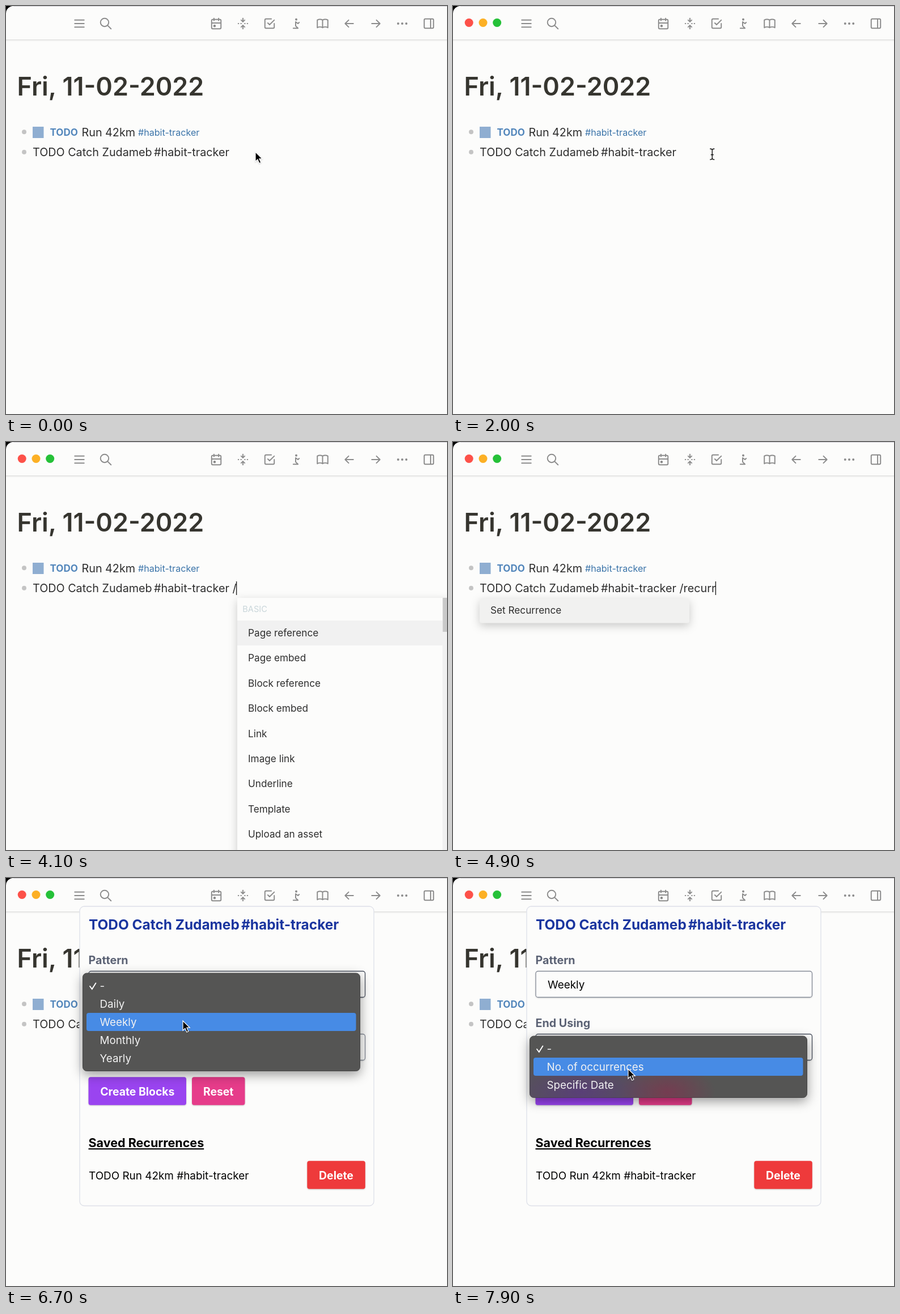
Write an HTML page that moves like this. It is 778 px wide and 720 px high and loops after 8000 ms.

```html
<!DOCTYPE html>
<html lang="en">
<head>
<meta charset="utf-8">
<title>Recurring tasks</title>
<style>
  html, body { margin: 0; width: 100%; height: 100%; overflow: hidden; background: #000; }
  svg { display: block; }
  text { font-family: Inter, "Liberation Sans", sans-serif; white-space: pre; }
  .icon { fill: none; stroke: #8c8c8c; stroke-width: 1.9; stroke-linecap: round; stroke-linejoin: round; }
  .paper { fill: #fcfcfb; }
  .block { font-size: 19.75px; fill: #2e2e2e; }
  .tag { font-size: 16.1px; fill: #3b74a9; }
  .item { font-size: 17.2px; fill: #2e2e2e; }
  .label { font-size: 19.7px; font-weight: 700; fill: #5b6274; }
  .plain { font-size: 18.9px; fill: #000; }
  .heading { font-size: 24.4px; font-weight: 700; fill: #1a359f; }
  .button { font-size: 19.4px; font-weight: 700; fill: #fff; text-anchor: middle; }
  .field { fill: #fcfcfb; stroke: #858b97; stroke-width: 1.3; filter: drop-shadow(0 1px 1px #0002); }
  .field.focus { stroke: #4a515f; }
  .option { font-size: 18.8px; fill: #f2f2f2; }
  .soft { filter: drop-shadow(0 1px 1px #0003); }
  .panel { filter: drop-shadow(0 5px 8px #0003); }
  .dropdown { filter: drop-shadow(0 6px 10px #0006); }
</style>
</head>
<body>
<svg width="778" height="720" viewBox="0 0 778 720">
  <defs>
    <radialGradient id="purple"><stop stop-color="#5b3685" stop-opacity=".7"/><stop offset="1" stop-color="#5b3685" stop-opacity="0"/></radialGradient>
    <radialGradient id="pink"><stop stop-color="#8a2c4f" stop-opacity=".6"/><stop offset="1" stop-color="#8a2c4f" stop-opacity="0"/></radialGradient>
    <clipPath id="endClip"><rect x="135.5" y="279" width="489" height="108.5" rx="7"/></clipPath>
  </defs>

  <path class="paper" d="M0 720V13A13 13 0 0 1 13 0H778V720Z"/>
  <path d="M13 .5H778" stroke="#cfcdd2"/>
  <path d="M0 59.5H778" stroke="#dededd"/>
  <path d="M0 61H778" stroke="#f1f1f0" stroke-width="2"/>
  <g id="lights">
    <circle cx="28.2" cy="29.5" r="7.5" fill="#fd5149"/>
    <circle cx="53" cy="29.5" r="7.5" fill="#fcb025"/>
    <circle cx="77.7" cy="29.5" r="7.5" fill="#25c138"/>
  </g>
  <g id="icons" class="icon"></g>

  <text x="19.6" y="158" font-size="44.9" font-weight="600" fill="#36352f">Fri, 11-02-2022</text>
  <g fill="#c4c4c4"><circle cx="32" cy="222.3" r="4"/><circle cx="32" cy="257.8" r="4"/></g>
  <rect x="47" y="213" width="19.5" height="20" fill="#8faed1"/>
  <text x="77.5" y="229" font-size="17" font-weight="700" fill="#5286bb">TODO</text>
  <text class="block" x="133.5" y="230">Run 42km</text>
  <text class="tag" x="233" y="229">#habit-tracker</text>
  <text class="block" x="47" y="265">TODO Catch Zudameb</text>
  <text class="block" id="typed" x="261" y="265" xml:space="preserve">#habit-tracker</text>
  <path id="caret" d="M0 246V270" stroke="#222" stroke-width="1.4"/>

  <g id="commands">
    <rect class="panel paper" x="408" y="275" width="372" height="460"/>
    <rect x="408" y="315" width="362" height="44" fill="#f1f1f1"/>
    <rect x="770" y="275" width="8" height="445" fill="#f1f1f1"/>
    <rect x="770.5" y="275" width="7.5" height="60" fill="#c9c9c9"/>
    <text x="417.3" y="300" font-size="14.6" fill="#c9d6da">BASIC</text>
  </g>
  <g id="match">
    <rect class="panel" x="47" y="276" width="370" height="43.5" rx="4" fill="#f1f1f0"/>
    <text class="item" x="66" y="303">Set Recurrence</text>
  </g>

  <g id="modal">
    <rect class="paper" x="130" y="50" width="519" height="528.5" rx="8" stroke="#dee0e9" stroke-width="1.3"/>
    <text class="heading" x="146" y="91">TODO Catch Zudameb</text>
    <text class="heading" x="415" y="91">#habit-tracker</text>
    <text class="label" x="145.5" y="152">Pattern</text>
    <rect class="field" id="patternField" x="146" y="164.5" width="487.5" height="46" rx="4"/>
    <text class="plain" id="pattern" x="167" y="195">-</text>
    <text class="label" x="145.5" y="263">End Using</text>
    <rect class="field" id="endField" x="146" y="275.5" width="487.5" height="46" rx="4"/>
    <text class="plain" x="167" y="306">-</text>
    <g class="soft">
      <rect x="145.5" y="351.3" width="172.5" height="49.5" rx="4" fill="#9a44f0"/>
      <rect x="328" y="351.3" width="93.5" height="49.5" rx="4" fill="#e63c8a"/>
      <rect x="531.3" y="499.3" width="102.5" height="49.5" rx="4" fill="#ee3a3b"/>
    </g>
    <text class="button" x="231.8" y="383.5">Create Blocks</text>
    <text class="button" x="374.7" y="383.5">Reset</text>
    <text class="button" x="582.5" y="531.5">Delete</text>
    <text x="145.5" y="475" font-size="21.5" font-weight="700" text-decoration="underline">Saved Recurrences</text>
    <text class="plain" x="146" y="531.5">TODO Run 42km #habit-tracker</text>
  </g>
  <g id="patternMenu"></g>
  <g id="endMenu"></g>

  <g id="pointer">
    <path id="arrow" class="soft" d="M0 0V17l3.9-3.7 2.9 6.7 3-1.3-2.9-6.5h5.4z" fill="#000" stroke="#fff" stroke-width="1.2"/>
    <path id="beam" d="M-4-9.5Q0-9.5 0-7Q0-9.5 4-9.5M0-7V7M-4 9.5Q0 9.5 0 7Q0 9.5 4 9.5M-2.5 1H2.5" fill="none" stroke="#111" stroke-width="1.4"/>
  </g>
</svg>
<script>
const $ = id => document.getElementById(id);
const show = (id, on) => $(id).style.display = on ? '' : 'none';

// Toolbar icons on a 24-unit grid, keyed by centre x
const dot = x => `M${x - 1} 12a1 1 0 1 0 2 0a1 1 0 1 0-2 0`;
const icons = {
  129.5: 'M4 6h16M4 12h16M4 18h16',
  176: 'M3 10a7 7 0 1 0 14 0a7 7 0 1 0-14 0M21 21l-6-6',
  371: 'M6 5h12a2 2 0 0 1 2 2v12a2 2 0 0 1-2 2H6a2 2 0 0 1-2-2V7a2 2 0 0 1 2-2M16 3v4M8 3v4M4 11h16M8 15h2v2h-2z',
  418: 'M12 3v6l3-3M9 6l3 3M12 21v-6l3 3M9 18l3-3M4 12h.6M8.5 12h.6M15 12h.6M19.4 12h.6',
  465: 'M9 11l3 3l8-8M20 12v6a2 2 0 0 1-2 2H6a2 2 0 0 1-2-2V6a2 2 0 0 1 2-2h9',
  512: 'M11 5a1 1 0 1 0 2 0a1 1 0 1 0-2 0M7 20h8l-4-4V9l4 3l2-2',
  558.5: 'M3 19a9 9 0 0 1 9 0a9 9 0 0 1 9 0M3 6a9 9 0 0 1 9 0a9 9 0 0 1 9 0M3 6v13M12 6v13M21 6v13',
  605.5: 'M5 12h14M5 12l6 6M5 12l6-6',
  652.5: 'M5 12h14M19 12l-6 6M19 12l-6-6',
  699: dot(5) + dot(12) + dot(19),
  746: 'M6 4h12a2 2 0 0 1 2 2v12a2 2 0 0 1-2 2H6a2 2 0 0 1-2-2V6a2 2 0 0 1 2-2M15 4v16'
};
$('icons').innerHTML = Object.entries(icons).map(([x, d]) =>
  `<path transform="translate(${x} 31) scale(1.03) translate(-12 -12)" d="${d}"/>`).join('');

$('commands').innerHTML += ['Page reference', 'Page embed', 'Block reference', 'Block embed', 'Link',
  'Image link', 'Underline', 'Template', 'Upload an asset'].map((name, i) =>
  `<text class="item" x="427" y="${343 + i * 44.4}">${name}</text>`).join('');

const ROW = 32;
function buildMenu(id, top, options, tint = '') {
  $(id).innerHTML = `
    <rect class="dropdown" x="135.5" y="${top}" width="489" height="${options.length * ROW + 12.5}" rx="7" fill="#555554" stroke="#444"/>
    ${tint}
    <rect class="hover" x="142" width="475.5" height="${ROW}" rx="4" fill="#478be5"/>
    <path d="M148 ${top + 23}l3.8 5 6.6-10.5" fill="none" stroke="#fff" stroke-width="1.9" stroke-linecap="round"/>` +
    options.map((name, i) =>
      `<text class="option" x="165.5" y="${top + 28.7 + i * ROW}">${name}</text>`).join('');
  const hover = $(id).querySelector('.hover');
  return y => {
    const row = Math.floor((y - top - 6) / ROW);
    hover.setAttribute('y', top + 6 + ROW * Math.max(0, Math.min(options.length - 1, row)));
  };
}
const hoverPattern = buildMenu('patternMenu', 168, ['-', 'Daily', 'Weekly', 'Monthly', 'Yearly']);
const hoverEnd = buildMenu('endMenu', 279, ['-', 'No. of occurrences', 'Specific Date'],
  `<g clip-path="url(#endClip)">
     <ellipse cx="225" cy="378" rx="135" ry="58" fill="url(#purple)"/>
     <ellipse cx="378" cy="378" rx="85" ry="52" fill="url(#pink)"/>
   </g>`);

// Pointer stops: time, x, y
const stops = [
  [0, 440, 257.5], [900, 440, 257.5], [1500, 457.3, 261.5], [5350, 457.3, 261.5], [5700, 322, 184],
  [6250, 322, 184], [6700, 312, 252], [7050, 312, 252], [7400, 310, 303], [7600, 310, 303],
  [7850, 309, 337], [8000, 309, 337]
];
function pointerAt(t) {
  const i = stops.findIndex(s => s[0] > t);
  const [t0, x0, y0] = stops[i - 1], [t1, x1, y1] = stops[i];
  const p = (t - t0) / (t1 - t0), e = p * p * (3 - 2 * p);
  return [x0 + (x1 - x0) * e, y0 + (y1 - y0) * e];
}

const keyTimes = [3400, 3800, 4400, 4500, 4600, 4700, 4800, 4900];
const MODAL = 5300;

function draw(t) {
  const [x, y] = pointerAt(t);
  const modal = t >= MODAL;
  show('lights', t >= 500);

  const keys = modal ? 0 : keyTimes.filter(k => k <= t).length;
  $('typed').textContent = '#habit-tracker' + ' /recurr'.slice(0, keys);
  const blinkOn = t >= 3400 || (t - 2400) % 1000 < 500;
  show('caret', t >= 2400 && !modal && blinkOn);
  $('caret').setAttribute('transform', `translate(${261 + $('typed').getComputedTextLength()} 0)`);
  show('commands', t >= 3800 && t < 4450);
  show('match', t >= 4450 && !modal);

  show('modal', modal);
  $('pattern').textContent = t < 7050 ? '-' : 'Weekly';
  $('patternField').classList.toggle('focus', t >= 5750 && t < 7450);
  $('endField').classList.toggle('focus', t >= 7450);
  const fade = Math.max(0, Math.min(1, 1 - (t - 6750) / 263));
  show('patternMenu', t >= 5750 && fade > 0);
  $('patternMenu').style.opacity = fade;
  hoverPattern(y);
  show('endMenu', t >= 7500);
  hoverEnd(y);

  const beam = t >= 1000 && t < 2700;
  show('pointer', t < 2700 || modal);
  show('beam', beam);
  show('arrow', !beam);
  $('pointer').setAttribute('transform', `translate(${x} ${y})`);
}

const start = performance.now();
function tick() {
  draw((performance.now() - start) % 8000);
  requestAnimationFrame(tick);
}
tick();
</script>
</body>
</html>
```
